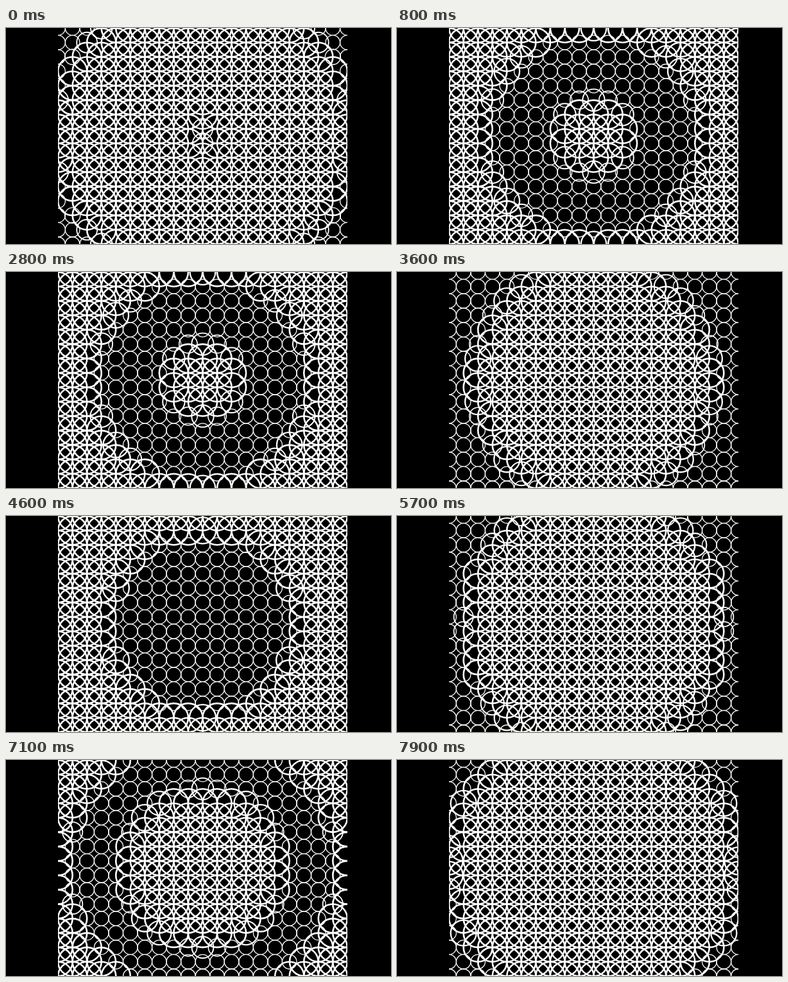
These frames come from a looping animation (600x338 px, 8 s). An HTML page with a canvas:

```html
<!DOCTYPE html>
<html>
<head>
<meta charset="utf-8">
<style>
html, body { margin: 0; height: 100%; overflow: hidden; background: #000; }
canvas { display: block; }
</style>
</head>
<body>
<canvas id="stage" width="600" height="338"></canvas>
<script>
const ctx = document.getElementById('stage').getContext('2d');
const CELL = 22.54, CX = 306.5, CY = 169.2;
const PERIOD = 2, BIG_TIME = 1.33, FADE = 0.06;

// [distance in cells, second at which the circles there grow]
const WAVE = [[0, .63], [2.6, .805], [5.5, 1.1], [6.4, 1.27], [7.6, 1.505],
  [9.05, 1.715], [10.1, 1.89], [10.25, 2], [12.2, 2.17], [13, 2.28]];

const clamp = v => Math.max(0, Math.min(1, v));
const step = v => clamp(.5 + v / FADE);

function growTime(d) {
  const i = WAVE.findIndex(p => p[0] > d);
  const [d0, t0] = WAVE[i - 1], [d1, t1] = WAVE[i];
  return t0 + (t1 - t0) * (d - d0) / (d1 - d0);
}

const circles = [];
for (let row = -7.5; row <= 7.5; row++)
  for (let col = -10; col <= 10; col++)
    circles.push({ x: CX + col * CELL, y: CY + row * CELL, start: growTime(Math.hypot(col, row)) });

function draw(time) {
  ctx.fillStyle = '#000';
  ctx.fillRect(0, 0, 600, 338);
  ctx.save();
  ctx.beginPath();
  ctx.rect(81, 0, 451, 338);
  ctx.clip();
  ctx.strokeStyle = '#fff';
  for (const { x, y, start } of circles) {
    const age = (time - start + .3 + 2 * PERIOD) % PERIOD - .3;
    const size = 1 + step(age) - step(age - BIG_TIME);
    ctx.lineWidth = 1.3 * size;
    ctx.beginPath();
    ctx.arc(x, y, CELL / 2 * size, 0, 2 * Math.PI);
    ctx.stroke();
  }
  ctx.restore();
}

const begin = performance.now();
function tick() {
  const ticks = Math.floor((performance.now() - begin) / 100);
  draw(ticks % 20 / 10);
  requestAnimationFrame(tick);
}
tick();
</script>
</body>
</html>
```
